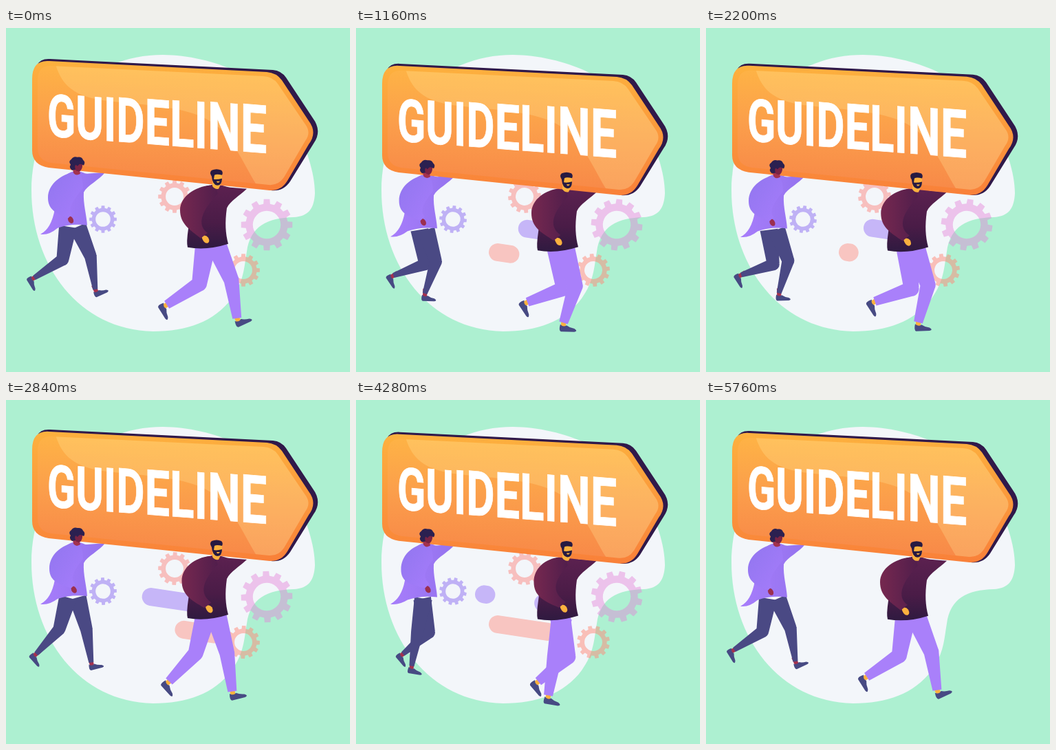
These frames come from a looping animation (500 by 500 pixels, 5.8 s). An HTML page:

```html
<!DOCTYPE html>
<html lang="en">
<head>
<meta charset="utf-8">
<title>Guideline</title>
<style>
  html, body { margin: 0; width: 100%; height: 100%; overflow: hidden; background: #adf0d1; }
  svg { display: block; width: 100%; height: 100%; }
  .bar { stroke-linecap: round; }
  .word { font-family: Roboto, "Liberation Sans", sans-serif; font-weight: 700; fill: #fff; stroke: #fff; stroke-width: .8; }
</style>
</head>
<body>
<svg viewBox="0 0 500 500">
  <defs>
    <linearGradient id="face" x1=".55" y1="0" x2=".45" y2="1">
      <stop offset="0" stop-color="#ffb944"/>
      <stop offset=".5" stop-color="#fb9e4b"/>
      <stop offset="1" stop-color="#f78347"/>
    </linearGradient>
    <linearGradient id="rim" x1=".5" y1="0" x2=".5" y2="1">
      <stop offset="0" stop-color="#fdb13e"/>
      <stop offset="1" stop-color="#f98039"/>
    </linearGradient>
    <linearGradient id="coat">
      <stop offset="0" stop-color="#a77dfb"/>
      <stop offset="1" stop-color="#9473ee"/>
    </linearGradient>
    <linearGradient id="coatArm" x1="0" y1="0" x2="1" y2="1">
      <stop offset="0" stop-color="#9176ef"/>
      <stop offset="1" stop-color="#a67cfb"/>
    </linearGradient>
    <linearGradient id="knit" x1="0" y1="0" x2="0" y2="1">
      <stop offset="0" stop-color="#5c2150"/>
      <stop offset=".6" stop-color="#4a1c47"/>
      <stop offset="1" stop-color="#2f1a40"/>
    </linearGradient>
    <linearGradient id="knitArm">
      <stop offset="0" stop-color="#76284f"/>
      <stop offset="1" stop-color="#511e4c"/>
    </linearGradient>
    <clipPath id="panel">
      <path d="M46 76Q46 54 66 55L374 70Q388 71 395 81L435 140Q444 152 435 164L404 217Q396 229 382 228L66 196Q46 193 46 174Z"/>
    </clipPath>
  </defs>

  <path fill="#f3f6fa" d="M228 39C300 40 385 72 420 140C436 174 449 210 449 240C448 262 440 274 418 275C380 276 355 288 350 325C346 348 346 368 328 393C303 427 262 441 214 441C106 439 37 345 37 236C38 120 122 39 228 39Z"/>
  <g id="gears"></g>
  <g id="bars"></g>

  <g id="womanLegs"></g>
  <g id="manLegs"></g>

  <g id="womanBody">
    <path id="coatShape" fill="url(#coat)"/>
    <path id="womanHand" fill="#9b2f50" d="M-4 -5Q2 -6 4 0Q5 6 0 5Q-5 3 -4 -5Z"/>
    <path id="womanSleeve" fill="url(#coatArm)"/>
  </g>
  <g id="manBody">
    <path fill="url(#knit)" d="M300 227C312 226 318 230 326 231L350 233C340 243 326 250 321 261C318 282 319 298 323 313Q292 323 264 318Q262 311 265 291L271 243Q283 229 300 227Z"/>
    <path id="manHand" fill="#fbb13f" d="M-6 -4Q0 -7 4 -2Q7 4 3 6Q-3 7 -6 -4Z"/>
    <path id="manSleeve" fill="url(#knitArm)"/>
  </g>

  <g id="sign">
    <path fill="#30194a" d="M45 54Q50 44 64 45L388 61Q400 62 407 72L446 131Q460 150 447 168L413 223Q403 238 385 236Z"/>
    <path fill="url(#rim)" d="M38 74Q38 46 63 48L379 64Q393 65 401 76L440 135Q453 152 440 169L409 222Q400 237 383 236L62 203Q38 199 38 178Z"/>
    <g clip-path="url(#panel)">
      <path fill="url(#face)" d="M38 40H458V245H38Z"/>
      <path fill="#ffe9a0" opacity=".25" d="M70 45C78 80 95 98 140 105C210 114 280 112 315 150C340 178 352 212 372 240H460V40Z"/>
    </g>
    <text class="word" id="word" transform="matrix(.706 .055 0 1 60 157)"></text>
  </g>

  <g id="womanHead">
    <path fill="#a3324f" d="M97 204L106 203L108 211Q102 215 98 210Z"/>
    <path fill="#7a2344" d="M100 194H111Q112 203 108 207Q103 209 100 204Z"/>
    <path fill="#2b2050" d="M96 206Q91 202 94 198Q90 193 95 190Q98 185 104 187Q110 186 112 191Q116 194 113 199Q107 195 105 199Q103 201 102 198Q99 199 101 205Z"/>
  </g>
  <g id="manHead">
    <path fill="#fbb13f" d="M300 211H314V222Q311 229 309 233Q303 234 300 229Z"/>
    <path fill="#271a42" d="M299 215Q295 209 299 206Q306 203 313 206Q316 209 314 213Q306 211 303 213L302 219Q307 220 314 218Q314 228 307 228Q300 227 299 215Z"/>
    <path fill="#fbb13f" d="M306 222H311L309 224H307Z"/>
  </g>
</svg>

<script>
const LOOP = 5800;
const STEPS = 6;
const NS = "http://www.w3.org/2000/svg";
const { PI, sin, cos, min, max, hypot } = Math;
const $ = id => document.getElementById(id);
const ramp = (x, from, to) => min(1, max(0, (x - from) / (to - from)));
const mix = (a, b, k) => a + (b - a) * k;

function set(el, attrs) {
  for (const key in attrs) el.setAttribute(key, attrs[key]);
  return el;
}
const add = (parent, tag, attrs) => set(parent.appendChild(document.createElementNS(NS, tag)), attrs);

// Letters grow to the right, as the sign is seen in perspective.
[..."GUIDELINE"].forEach((letter, i) => {
  add($("word"), "tspan", { "font-size": 86 + 1.4 * i }).textContent = letter;
});

// The walk starts briskly, then settles to an even pace.
function walked(t) {
  const u = min(1, t / (LOOP - 40));
  return STEPS * u + .13 * (1 - u) * sin(4 * PI * u);
}

// Ankle paths from the hip over one step; early and late shape heel strike and push-off.
function stance(p) {
  const early = (1 - p) ** 6, late = p ** 6;
  return {
    x: mix(33, -56, p) - 8 * sin(PI * p),
    y: 99 - 7 * early - 24 * late,
    angle: 20 * p - 25 * early + 38 * late
  };
}
function swing(p) {
  return {
    x: mix(-56, 33, p) - 14 * sin(PI * p),
    y: mix(75, 92, p) - 8 * sin(2 * PI * p),
    angle: mix(58, -25, p ** 3)
  };
}

// Two-bone joint, always bending forward.
function kneeOf(hip, ankle, thigh, shin) {
  const dx = ankle[0] - hip[0], dy = ankle[1] - hip[1], d = hypot(dx, dy);
  const along = d < thigh + shin ? (thigh ** 2 - shin ** 2 + d * d) / (2 * d) : d / 2;
  const out = Math.sqrt(max(0, thigh ** 2 - along ** 2)) * (d < thigh + shin);
  return [hip[0] + (dx * along + dy * out) / d, hip[1] + (dy * along - dx * out) / d];
}

function taper(a, b, wa, wb) {
  const dx = b[0] - a[0], dy = b[1] - a[1], d = hypot(dx, dy);
  const at = (p, w) => `${p[0] - dy / d * w} ${p[1] + dx / d * w}`;
  return `M${at(a, wa)}L${at(b, wb)}L${at(b, -wb)}L${at(a, -wa)}Z`;
}

const disc = ([x, y], r) => `M${x + r} ${y}A${r} ${r} 0 1 0 ${x - r} ${y}A${r} ${r} 0 1 0 ${x + r} ${y}Z`;

function makeLeg(parent, cloth, skin, path) {
  const foot = add(parent, "g", {});
  add(foot, "path", { d: "M-3 -7H3.5L3 6H-3Z", fill: skin });
  add(foot, "path", { d: "M-4 2Q-6 10 -3 11L14 11Q19 10 14 7Q8 6 4 3Q0 6 -4 2Z", fill: "#474a83" });
  return { path, foot, limb: add(parent, "path", { fill: cloth }) };
}

function makeWalker(name, look) {
  const legs = [swing, stance].map(path => makeLeg($(name + "Legs"), look.cloth, look.skin, path));
  return { name, legs, ...look };
}

const walkers = [
  makeWalker("woman", {
    hip: [97, 288], scale: 1, widths: [13, 9, 3.5], cloth: "#4a4984", skin: "#a3324f",
    hand: s => [94 + 21 * s, 278 - 7 * s], elbow: s => 61 + 9 * s,
    sleeve: (l, x, y) => `M101 208C80 212 ${l} 226 ${l} 246C${l} 262 ${l + 10} 268 ${x - 4} ${y - 2}L${x + 2} ${y - 8}C${x - 4} ${y - 14} 95 252 112 232Q112 211 101 208Z`
  }),
  makeWalker("man", {
    hip: [298, 316], scale: 1.15, widths: [15, 11, 6.5], cloth: "#a980fa", skin: "#fbb13f",
    hand: s => [290 + 24 * s, 306 - 8 * s], elbow: s => 253 + 11 * s,
    sleeve: (l, x, y) => `M296 228C275 230 ${l} 244 ${l} 264C${l} 284 ${l + 14} 292 ${x - 7} ${y - 1}L${x + 3} ${y - 9}C${x - 10} ${y - 18} 279 270 308 240Q306 229 296 228Z`
  })
];

function drawWalker(w, p, bob, reach) {
  const k = w.scale, [hx, hy] = w.hip, [wide, mid, thin] = w.widths;
  w.legs.forEach((leg, i) => {
    const { x, y, angle } = leg.path(p);
    const side = (i ? 1 : -1) * 7 * cos(PI * p);
    const hip = [hx + side * k, hy + bob];
    const ankle = [hx + x * k, hy + y * k];
    const knee = kneeOf([hx, hip[1]], ankle, 50 * k, 49 * k);
    set(leg.limb, { d: taper(hip, knee, wide, mid) + taper(knee, ankle, mid, thin) + disc(knee, mid) });
    set(leg.foot, { transform: `translate(${ankle}) rotate(${angle}) scale(${k})` });
  });
  const [x, y] = w.hand(reach);
  set($(w.name + "Hand"), { transform: `translate(${x} ${y})` });
  set($(w.name + "Sleeve"), { d: w.sleeve(w.elbow(reach), x, y) });
  for (const part of ["Body", "Head"]) set($(w.name + part), { transform: `translate(0 ${bob})` });
}

function coatPath(reach) {
  const tip = 299 - 6 * reach;
  return `M97 208C110 206 112 211 118 211L144 209C136 220 118 228 113 238C112 255 117 270 118 286Q95 283 75 290Q62 ${tip + 2} 50 ${tip}Q66 ${tip - 8} 71 262L76 230Q84 211 97 208Z`;
}

// Each bar's leading end runs from one side to the other, then its trailing end follows.
const BARS = [
  { color: "#f8c2be", from: 213, to: 80, x: 200, y: 247, delay: .59, lead: .3, trail: [.12, .29] },
  { color: "#c6b6f8", from: 173, to: 300, x: 197, y: 284, delay: .3, lead: .7, trail: [.45, 1.5] },
  { color: "#f8c5c1", from: 193, to: 316, x: 206, y: 326, delay: .11, lead: .44, trail: [.75, .97] }
];
for (const b of BARS) {
  b.lines = [0, 1].map(() => add($("bars"), "line", { class: "bar", stroke: b.color }));
}

function drawBar(b, p) {
  b.lines.forEach((line, age) => {
    const g = (p - b.delay + 1) % 1 + age;
    const head = mix(b.from, b.to, ramp(g, 0, b.lead));
    const tail = mix(b.from, b.to, ramp(g, ...b.trail));
    const lo = min(head, tail), hi = max(head, tail), width = min(26, hi - lo);
    const y = x => b.y + (x - b.x) * .15;
    const x1 = lo + width / 2, x2 = max(hi - width / 2, x1 + .01);
    set(line, { x1, y1: y(x1), x2, y2: y(x2), "stroke-width": width });
  });
}

const GEARS = [
  { x: 141, y: 278, r: 20, color: "#9678f3", alpha: .55 },
  { x: 245, y: 245, r: 24, color: "#fb8f88", alpha: .52 },
  { x: 379, y: 286, r: 37.5, color: "#e283d7", alpha: .45 },
  { x: 345, y: 352, r: 24, color: "#ff8a78", alpha: .5 }
];

function gearPath(r) {
  const teeth = 12, points = [];
  for (let i = 0; i < teeth; i++) {
    for (const [at, size] of [[-.3, .82], [-.22, 1], [.22, 1], [.3, .82]]) {
      const a = (i + at) * 2 * PI / teeth;
      points.push(`${cos(a) * r * size} ${sin(a) * r * size}`);
    }
  }
  return `M${points.join("L")}Z${disc([0, 0], r * .54)}`;
}
for (const g of GEARS) {
  g.el = add($("gears"), "path", { d: gearPath(g.r), fill: g.color, "fill-rule": "evenodd", opacity: g.alpha });
}

function render(t) {
  const p = walked(t) % 1;
  const bob = 5.5 * sin(2 * PI * (p + .02));
  const reach = .8 * sin(PI * p * p);

  set($("sign"), { transform: `translate(0 ${7 * sin(2 * PI * p)})` });
  set($("coatShape"), { d: coatPath(reach) });
  for (const w of walkers) drawWalker(w, p, bob, reach);

  $("gears").style.display = t < LOOP - 60 ? "" : "none";
  GEARS.forEach((g, i) => {
    const turn = (i % 2 ? -180 : 180) * t / LOOP;
    set(g.el, { transform: `translate(${g.x} ${g.y}) rotate(${turn})` });
  });
  $("bars").style.display = t >= 40 && t < LOOP - 80 ? "" : "none";
  for (const b of BARS) drawBar(b, p);
}

const start = performance.now();
function tick() {
  render((performance.now() - start) % LOOP);
  requestAnimationFrame(tick);
}
render(0);
requestAnimationFrame(tick);
</script>
</body>
</html>
```
